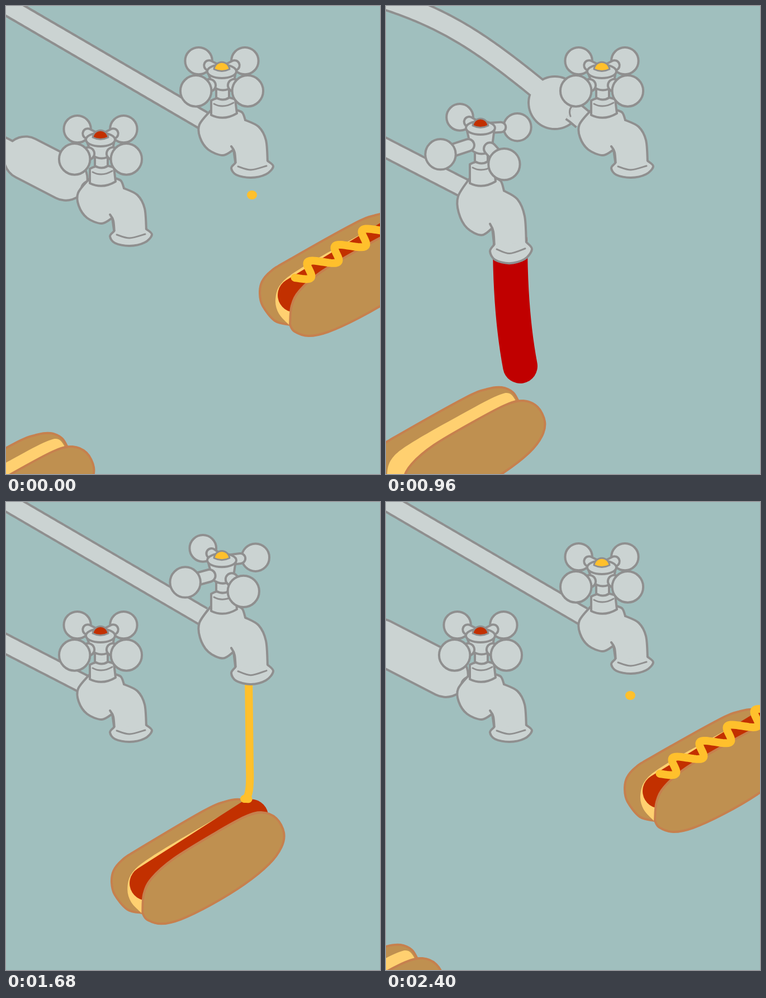
Write an HTML page that moves like this. It is 669x837 px and loops after 2.48 s.

```html
<!DOCTYPE html>
<html lang="en">
<head>
<meta charset="utf-8">
<title>Hot dog taps</title>
<style>
  html, body { margin: 0; width: 100%; height: 100%; overflow: hidden; background: #a0bfbe; }
  svg { display: block; width: 669px; height: 837px; }
</style>
</head>
<body>
<svg id="stage" viewBox="0 0 669 837" stroke-linecap="round" stroke-linejoin="round"></svg>
<script>
const STEP = 80, COUNT = 31;
const METAL = '#cbd3d2', EDGE = '#8f8f8f', BUN = '#bf9050', CRUST = '#c6804e';
const CRUMB = '#ffd070', MUSTARD = '#ffc02c', RED = '#c00000', SAUSAGE = '#c23000';
const stage = document.getElementById('stage');

const clamp = v => Math.min(1, Math.max(0, v));
const ramp = (v, a, b) => { const t = clamp((v - a) / (b - a)); return t * t * (3 - 2 * t); };
const range = (n, fn) => Array.from({ length: n }, (_, i) => fn(i));
const points = s => s.trim().split(/\s+/).map(p => p.split(',').map(Number));

// Keyframes [time, values, ease exponent into this key]
function key(t, keys) {
  const i = keys.findIndex(k => t <= k[0]);
  if (i < 1) return keys[i < 0 ? keys.length - 1 : 0][1];
  const [t0, a] = keys[i - 1], [t1, b, ease = 1] = keys[i];
  const u = Math.pow((t - t0) / (t1 - t0), ease);
  return a.map((v, j) => v + (b[j] - v) * u);
}

// Catmull-Rom curve as Bezier path data
function smooth(p, start = 'M') {
  let d = start + p[0].join(' ');
  for (let i = 0; i < p.length - 1; i++) {
    const b = p[i], c = p[i + 1], a = p[i - 1] || b, e = p[i + 2] || c;
    d += `C${b[0] + (c[0] - a[0]) / 6} ${b[1] + (c[1] - a[1]) / 6} ` +
      `${c[0] - (e[0] - b[0]) / 6} ${c[1] - (e[1] - b[1]) / 6} ${c[0]} ${c[1]}`;
  }
  return d;
}
const line = p => 'M' + p.join('L');
const path = (d, fill, stroke = 'none', w = 4, cap = 'round') =>
  `<path d="${d}" fill="${fill}" stroke="${stroke}" stroke-width="${w}" stroke-linecap="${cap}"/>`;
const metal = d => path(d, METAL, EDGE);
const stroke = (d, w = 4, color = EDGE, cap) => path(d, 'none', color, w, cap);
const oval = (x, y, rx, ry, fill, edge = 'none') =>
  `<ellipse cx="${x}" cy="${y}" rx="${rx}" ry="${ry}" fill="${fill}" stroke="${edge}" stroke-width="4"/>`;
const group = (move, s) => `<g transform="${move}">${s}</g>`;
const tube = (d, w, cap) => stroke(d, w, EDGE, cap) + stroke(d, w - 8, METAL, cap);

// Tap at rest
const BULB = points('366,187 346,212 347,235 362,257 388,267 407,257');
const SPOUT = points('411,285 468,280 465,240 452,216 428,204');
const NAPE = points('428,204 423,191 413,186');
const CREASE = points('403,251 409,262 411,285');
const LIP = points('410,281 403,290 412,302 438,307 465,301 478,287 468,277');
const MOUTH = points('415,287 438,293 466,286');

// The swelling arrives, the tap bulges, then turns open and stretches
function tap(t, amount, color) {
  const shut = 1 - ramp(t, 13, 17);
  const squash = amount * ramp(t, 0, 4) * (1 - ramp(t, 4, 8));
  const open = ramp(t, 4, 11) * shut;
  const spin = (45 - 75 * ramp(t, 0, 8) * shut) * Math.PI / 180;

  const bend = p => p.map(([x, y]) => {
    const down = (y - 187) / 104, wide = 1 + .25 * squash * (1 - clamp(down) ** 4);
    return [400 + (x - 400) * wide,
      y + down * (27 * open - 16 * squash * clamp((x - 385) / 30))];
  });
  const [bulb, spout, nape, lip, mouth] = [BULB, SPOUT, NAPE, LIP, MOUTH].map(bend);
  const side = smooth(spout.slice(1));

  let s = path(smooth(bulb) + 'L' + spout[0] + smooth(spout.slice(1), 'L') + smooth(nape, 'L') + 'Z', METAL);
  s += stroke(smooth(bulb) + 'L' + spout[0]) + stroke(side) + stroke(smooth(nape)) + stroke(smooth(bend(CREASE)));
  s += path(smooth(lip) + 'Z', METAL) + stroke(smooth(lip));
  const gape = 45 * Math.max(0, squash - .7), [m0, m1, m2] = mouth;
  s += path(smooth(mouth) + smooth([m2, [m1[0], m1[1] - gape], m0], 'L'), gape ? EDGE : 'none', EDGE, 3);

  const cx = 386, cy = 114 + 8 * squash - 21 * open;
  const bx = 388, by = 160 + 3 * squash - 8 * open;
  const my = 125 + 12 * squash - 6 * open, size = 1 + .28 * open;
  const knobs = range(4, i => {
    const a = spin + i * Math.PI / 2, sin = Math.sin(a);
    return { x: cx + 62 * size * Math.cos(a) * (1 + .08 * sin), y: my + 38 * size * sin, r: 26 + 2.5 * sin, front: sin > .2 };
  });
  const ball = k => oval(k.x, k.y, k.r, k.r, METAL, EDGE);
  const back = knobs.filter(k => !k.front), front = knobs.filter(k => k.front);

  s += back.map(ball).join('');
  const [l, r] = [bulb[0], nape[2]];
  s += metal(`M${bx - 21} ${by + 9}L${l[0] + 1} ${l[1] + 8}Q${(l[0] + r[0]) / 2} ${l[1] + 19} ${r[0]} ${r[1] + 6}` +
    `L${bx + 22} ${by + 7}Q${bx} ${by - 2} ${bx - 21} ${by + 9}Z`);
  s += stroke(`M${bx - 16} ${by + 15}Q${bx} ${by + 24} ${bx + 19} ${by + 13}`, 3);
  s += metal(`M${bx - 12} ${by - 12}V${by + 4}Q${bx} ${by + 11} ${bx + 11} ${by + 4}V${by - 12}Z`);
  s += back.map(k => {
    const end = [cx + (k.x - cx) * .55, cy + 2 + (k.y - cy - 2) * .55];
    return tube(line([[cx, cy + 4], end]), 22);
  }).join('');
  s += metal(`M${cx - 25} ${cy + 4}L${bx - 18} ${by - 16}Q${bx} ${by - 3} ${bx + 18} ${by - 16}L${cx + 25} ${cy + 4}Z`);
  s += oval(cx, cy + 3, 26, 12, METAL, EDGE);
  s += path(`M${cx - 14} ${cy - 1}C${cx - 11} ${cy - 18} ${cx + 11} ${cy - 18} ${cx + 14} ${cy - 1}` +
    `Q${cx} ${cy + 6} ${cx - 14} ${cy - 1}Z`, color, EDGE, 3);
  s += front.map(k => {
    const hy = (cy + by) / 2, dx = k.x - cx, dy = k.y - hy, d = Math.hypot(dx, dy);
    return tube(line([[cx + dx / d * 23, hy + dy / d * 16], [k.x, k.y]]), 26) + ball(k);
  }).join('');
  return s;
}

// A pipe merged with the swelling that runs from tail to head inside it
function pipe(curve, w, tail, head, r) {
  const d = line(curve), lump = line([tail, head]), ahead = curve.filter(p => p[0] > head[0] + 28);
  if (r < 20) return tube(d, w, 'butt');
  let s = stroke(d, w, EDGE, 'butt') + stroke(lump, 2 * r) +
    stroke(d, w - 8, METAL, 'butt') + stroke(lump, 2 * r - 8, METAL);
  if (ahead.length > 1) {
    const [x, y] = ahead[0];
    s += tube(line(ahead), w, 'butt') + stroke(`M${x + 9} ${y - 13}Q${x - 8} ${y - 6} ${x - 2} ${y + 10}`, 3);
  }
  return s;
}

function lowerPipe(f) {
  const t = (f + 7) % COUNT, inside = Math.max(0, t - 11);
  const at = x => [x, 254 + .515 * x];
  const head = Math.min(107, 23 * t - 10) + 20 * inside;
  const tail = Math.min(head, 45 * Math.max(0, t - 6) - 10);
  return pipe(range(46, i => at(i * 4 - 30)), 37, at(tail), at(head), t < 15 ? 49 - 1.2 * t - 4 * inside : 0);
}

function upperPipe(f) {
  const bx = 110 + (f - 4) * (f < 4 ? 45 : 24), rest = 352 - bx;
  const amp = ramp(bx, -70, 90) * (1 - ramp(bx, 310, 360));
  const at = x => {
    const d = x - bx;
    let y = (22 - (bx - 110) * .125) * Math.exp(-d * d / 4900);
    if (d < 0) y += (16 - (bx - 110) * .235) * Math.sin(Math.PI * (x + 40) / (bx + 40));
    else if (rest > 0) y -= rest / 13 * Math.sin(Math.PI * d / rest);
    return [x, .583 * x - 1 + (amp && amp * y)];
  };
  const ball = at(bx);
  return pipe(range(94, i => at(i * 4 - 20)), 36 + 4 * amp, ball, ball, 49 * (1 - ramp(bx, 310, 380)));
}

// Bun, drawn around the pivot 288,682
const shape = s => smooth(points(s)) + 'Z';
const BACK = shape('187,772 160,765 138,738 133,716 137,695 152,677 180,659 300,592 340,576 366,573 386,582 397,600');
const INSIDE = shape('185,772 167,752 161,728 170,700 205,672 300,618 358,588 380,584 393,600');
const FRONT = shape('187,772 190,738 205,710 245,676 320,632 374,604 405,597 430,608 443,634 438,660 415,690 370,725 310,760 255,785 220,792 195,784 187,772');
const STOPS = [
  [8, [129, 791, 0]], [13, [129, 791, 0]], [17, [288, 682, 0]], [24, [457, 562, -4], 2],
  [28, [506, 527, -3]], [30, [582, 480, 0]], [31, [609, 480, 0]], [38, [879, 333, 0]]
];
function place(age) {
  if (age >= 8) return key(age, STOPS);
  const left = 1 - age / 8;
  return [129 - 127 * left ** 3, 791 + 82 * left ** 2.5, 0];
}

// Sausage centre line as one cubic Bezier
const LINK = [
  [6, [222, 415, 222, 415, 222, 415, 222, 415]],
  [12, [222, 420, 222, 495, 226, 570, 240, 644]],
  [14, [222, 430, 222, 540, 225, 690, 259, 702]],
  [17, [190, 516, 200, 610, 255, 650, 387, 613]],
  [20, [196, 719, 259, 681, 322, 642, 385, 604]]
];
const SQUIGGLE = range(120, i => {
  const k = -.5 + i / 119 * 3.92, wave = Math.cos(2 * Math.PI * (k - .16));
  return [374 - 49 * k - 10 + 14 * wave, 593 + 28.5 * k - 2 + 8 * wave];
});

function bun(age) {
  if (age < -2 || age > 38) return '';
  const [x, y, turn] = place(age);
  const move = s => group(`translate(${x} ${y}) rotate(${turn}) translate(-288 -682)`, s);
  let link = '', sauce = '';
  if (age >= 6) {
    const [ax, ay, ...rest] = key(age, LINK);
    link = stroke(`M${ax} ${ay}C${rest.join(' ')}`, 62, age < 19 ? RED : SAUSAGE);
    const swell = Math.max(0, 1 - Math.abs(age - 8) / 4);
    if (swell) link += oval(rest[4], rest[5] - 4 * swell, 31 + 10 * swell, 31 + 23 * swell, RED);
    if (age > 17) link = move(link);
  }
  if (age > 20) {
    // mustard reaches whatever part of the bun is below the tap
    const done = age > 28 ? 1 : clamp((x - 350) / 198);
    const laid = SQUIGGLE.slice(0, Math.max(3, Math.round(done * 120)));
    sauce = move(stroke(line(laid), 14, MUSTARD));
    if (age < 29) {
      const [px, py] = laid[laid.length - 1], a = turn * Math.PI / 180;
      const lx = x + (px - 288) * Math.cos(a) - (py - 682) * Math.sin(a);
      const ly = y + (px - 288) * Math.sin(a) + (py - 682) * Math.cos(a);
      sauce += stroke(`M434 310L436 ${ly - 55}Q438 ${ly} ${lx} ${ly}`, 14, MUSTARD);
    }
  }
  return move(path(BACK, BUN, CRUST) + path(INSIDE, CRUMB)) + link + move(path(FRONT, BUN, CRUST)) + sauce;
}

function drips(f) {
  if (f === 19 || f === 20) return stroke(`M434 310V${320 + (f - 18) * 80}`, 14, MUSTARD);
  const t = (f + 2) % COUNT;
  return t < 3 ? oval(434 + 3 * t, 354 - 8 * t, 9, 8, MUSTARD) : '';
}

function draw(f) {
  stage.innerHTML = '<rect width="669" height="837" fill="#a0bfbe"/>' + lowerPipe(f) + upperPipe(f) +
    [f + COUNT, f, f - COUNT].map(bun).join('') + drips(f) +
    group('translate(-217 122)', tap(f, 1, SAUSAGE)) + tap(f - 13, .65, MUSTARD);
}

const start = performance.now();
let shown = -1;
function tick() {
  const f = Math.floor((performance.now() - start) / STEP) % COUNT;
  if (f !== shown) draw(shown = f);
  requestAnimationFrame(tick);
}
tick();
</script>
</body>
</html>
```
